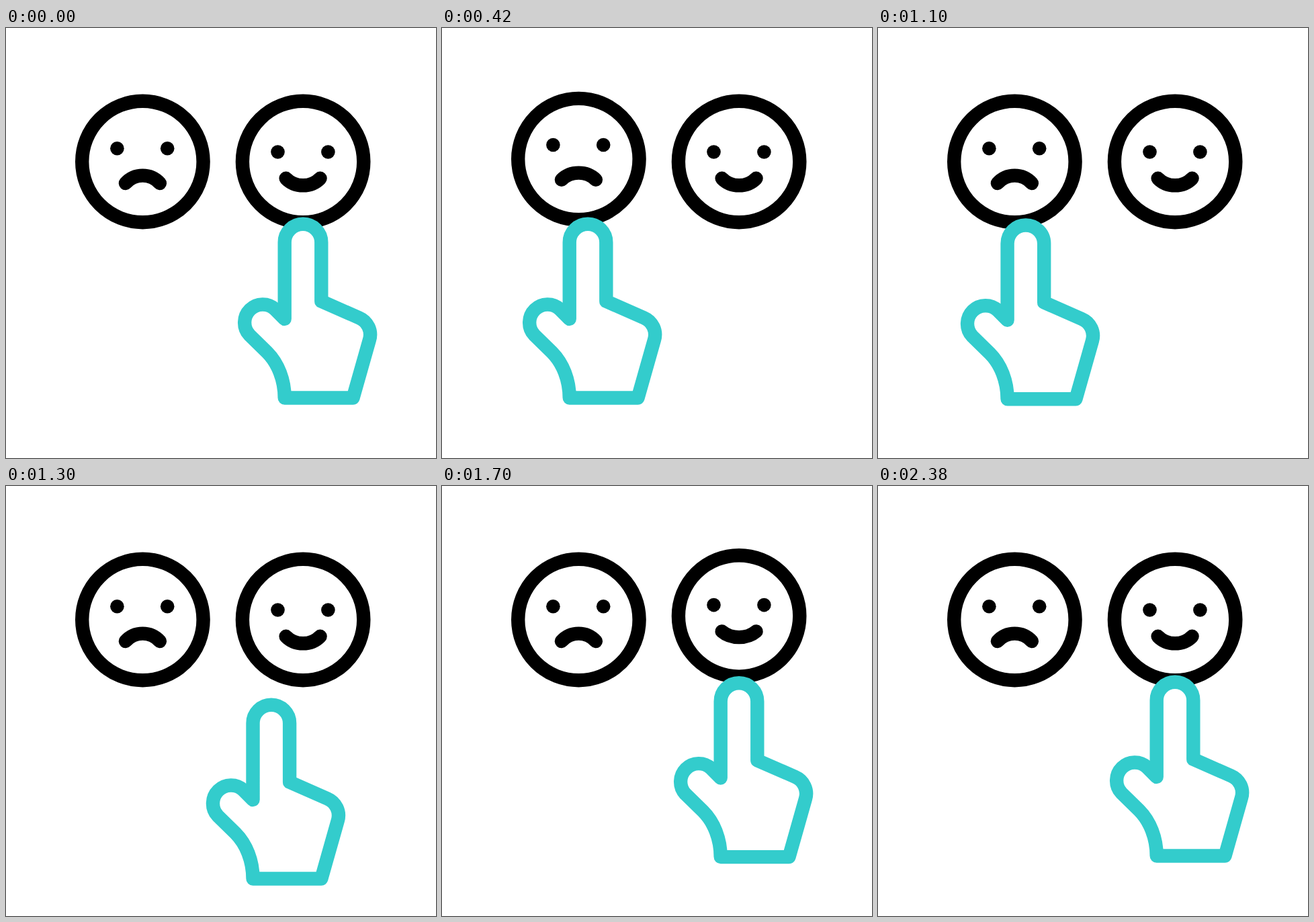
An HTML page that plays this animation: 640x640 px, repeating every 2.4 s.

```html
<!DOCTYPE html>
<html lang="en">
<head>
<meta charset="utf-8">
<title>Feedback choice</title>
<style>
html, body { margin: 0; width: 100%; height: 100%; overflow: hidden; background: #fff; }
svg { display: block; width: 100%; height: 100%; }
</style>
</head>
<body>
<svg viewBox="0 0 640 640">
  <g fill="none" stroke="#000" stroke-width="20.4" stroke-linecap="round" stroke-linejoin="round">
    <g id="sad">
      <circle cx="203.4" cy="199" r="90.2"/>
      <g class="features">
        <g fill="#000" stroke="none">
          <circle cx="165.4" cy="179.2" r="10.3"/>
          <circle cx="240.2" cy="179.2" r="10.3"/>
        </g>
        <path class="mouth"/>
      </g>
    </g>
    <g id="happy">
      <circle cx="442.1" cy="199" r="90.2"/>
      <g class="features">
        <g fill="#000" stroke="none">
          <circle cx="404.5" cy="184.5" r="10.3"/>
          <circle cx="479.4" cy="184.5" r="10.3"/>
        </g>
        <path class="mouth"/>
      </g>
    </g>
    <path id="hand" stroke="#33cccc" d="M414.7 550.5 H516.5 L541 464 A27.2 27.2 0 0 0 525.5 431.3
      L469.3 406.7 V319 A27.3 27.3 0 0 0 414.7 319 V433 L400.5 418.7
      A27 27 0 0 0 362.2 456.7 L388.5 482.5 C405 499 414.7 524 414.7 550.5 Z"/>
  </g>
</svg>
<script>
const LOOP = 2400, REACH = -238.6, DIP = 43, JUMP = 38;
const hand = document.getElementById('hand');

// Smooth progress from 0 to 1 between two times
function ease(t, from, to) {
  const p = Math.min(1, Math.max(0, (t - from) / (to - from)));
  return p * p * (3 - 2 * p);
}

// Rises to 1 at the peak and falls back to 0
const bump = (t, from, peak, to) => ease(t, from, peak) - ease(t, peak, to);

const shift = (el, x, y) => el.setAttribute('transform', `translate(${x} ${y})`);

function makeFace(id, x, y, bend) {
  const face = document.getElementById(id);
  const features = face.querySelector('.features');
  const mouth = face.querySelector('.mouth');
  return lift => {
    shift(face, 0, -JUMP * lift);
    shift(features, 0, -JUMP * lift / 3);
    const h = (bend - Math.sign(bend) * 12 * lift) * 4 / 3;
    mouth.setAttribute('d',
      `M${x - 25.5} ${y} C${x - 12} ${y + h} ${x + 12} ${y + h} ${x + 25.5} ${y}`);
  };
}

const sad = makeFace('sad', 203.4, 231, -11.4);
const happy = makeFace('happy', 442.1, 223.8, 10.5);

function draw(t) {
  sad(bump(t, 58, 259, 461));
  happy(bump(t, 1402, 1572, 1742));
  const x = REACH * (ease(t, 56, 483) - ease(t, 1043, 1404));
  const y = DIP * bump(t, 1059, 1402, 1740);
  shift(hand, x, y);
}

const start = performance.now();
function tick() {
  draw((performance.now() - start) % LOOP);
  requestAnimationFrame(tick);
}
draw(0);
requestAnimationFrame(tick);
</script>
</body>
</html>
```
